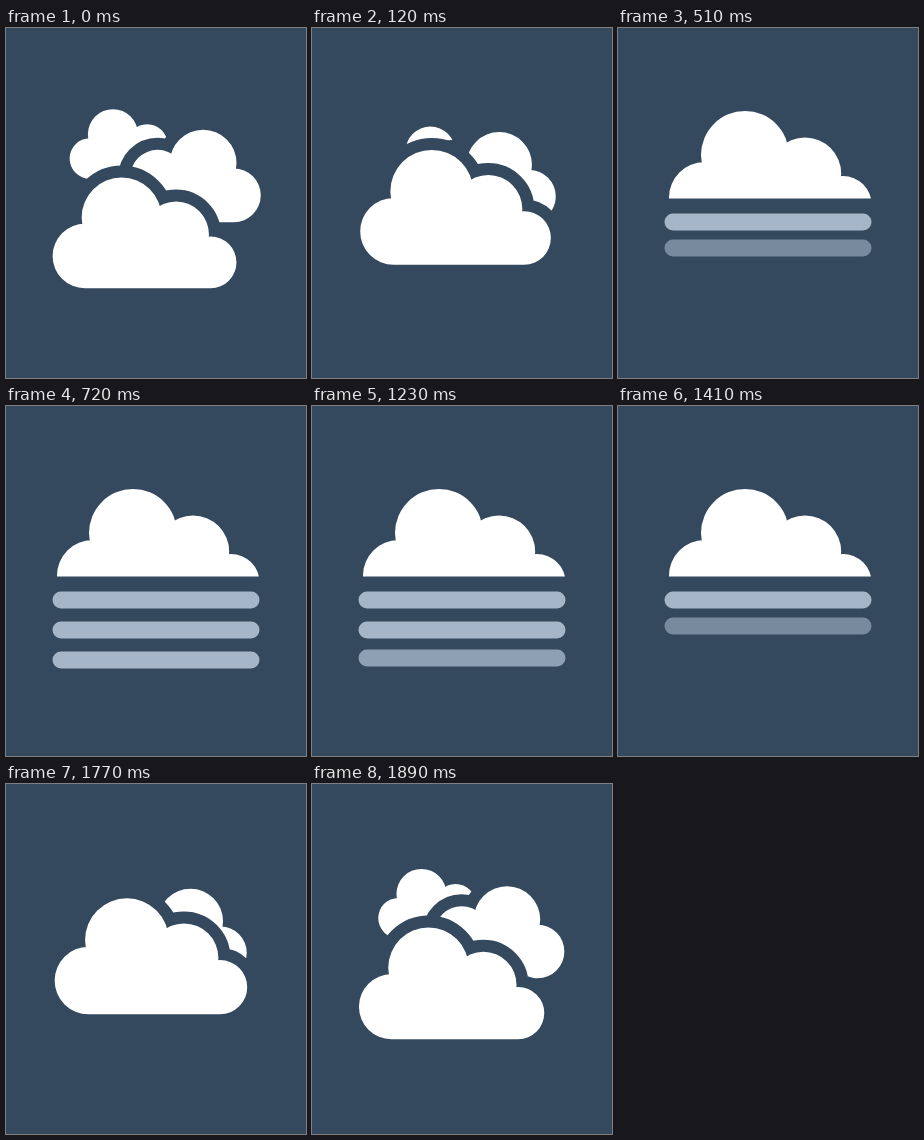
Recreate the animation shown at these times as an HTML page with a canvas. Size 300 by 350 pixels, loop 1920 ms.

```html
<!DOCTYPE html>
<html lang="en">
<head>
<meta charset="utf-8">
<title>Clouds to fog</title>
<style>
  html, body { margin: 0; width: 100%; height: 100%; overflow: hidden; background: #34495e; }
  canvas { display: block; }
</style>
</head>
<body>
<canvas id="stage" width="300" height="350"></canvas>
<script>
const ctx = document.getElementById('stage').getContext('2d');
const SKY = '#34495e', WHITE = '#fff', MIST = '#a5b6c9';
const LOOP = 1920, MORPH = 720, STEP = 30, GAP = 12, CUT = 170.5;

// Cloud outline, origin at the middle of its base
const cloud = new Path2D();
for (const [x, y, r] of [[-65.5, -35.5, 35.5], [-25, -78, 44], [35, -59.3, 36.2], [73, -28.5, 28.5]]) {
  cloud.moveTo(x + r, y);
  cloud.arc(x, y, r, 0, Math.PI * 2);
}
cloud.moveTo(-65.5, 0);
for (const [x, y] of [[-65.5, -35.5], [-25, -78], [35, -59.3], [73, -28.5], [73, 0]]) cloud.lineTo(x, y);
cloud.closePath();

const ramp = (t, a, b) => Math.min(1, Math.max(0, (t - a) / (b - a)));
const mix = (a, b, p) => a + (b - a) * p;

function drawCloud(x, y, scale, flip, alpha = 1) {
  ctx.save();
  ctx.translate(x, y);
  ctx.scale(flip * scale, scale);
  ctx.lineWidth = 2 * GAP / scale;
  ctx.lineJoin = 'round';
  ctx.strokeStyle = ctx.fillStyle = SKY;
  ctx.stroke(cloud);
  if (alpha < 1) ctx.fill(cloud);
  ctx.globalAlpha = alpha;
  ctx.fillStyle = WHITE;
  ctx.filter = 'blur(0.5px)';
  ctx.fill(cloud);
  ctx.restore();
}

// Three clouds gather on one base point
function gather(t) {
  const p = Math.pow(ramp(t, 0, 300), 1.1);
  const move = (x, y, from, to, flip) =>
    drawCloud(mix(x, 152, p), mix(y, 196, p), mix(from, to, p), flip);
  move(121.2, 150.7, 0.57, 0.55, 1);
  move(178.2, 194.2, 0.758, 0.72, -1);
  move(138.3, 260.3, 0.908, 1, 1);
}

function band(top, bottom, draw) {
  ctx.save();
  ctx.beginPath();
  ctx.rect(0, top, 300, bottom - top);
  ctx.clip();
  draw();
  ctx.restore();
}

// The merged cloud sinks and loses everything below the cut
function sink(t) {
  const y = 196 + 9 * ramp(t, 300, 390);
  const fade = ramp(t, 295, 385);
  const part = alpha => () => drawCloud(152, y, 1, 1, alpha);
  band(0, CUT, part(1 - fade * (1 - fade)));
  if (fade < 1) band(CUT, 350, part(1 - fade));
}

function bar(y, p) {
  if (!p) return;
  ctx.globalAlpha = p;
  ctx.fillStyle = MIST;
  ctx.beginPath();
  ctx.roundRect(46.5, y - 10 * (1 - p), 207, 17, 8.5);
  ctx.fill();
  ctx.globalAlpha = 1;
}

function draw(t) {
  ctx.fillStyle = SKY;
  ctx.fillRect(0, 0, 300, 350);
  if (t < 300) gather(t);
  else sink(t);
  bar(185.5, ramp(t, 330, 420));
  bar(215.5, ramp(t, 420, 570));
  bar(245.5, ramp(t, 570, 720));
}

const start = performance.now();
function tick() {
  const t = Math.floor((performance.now() - start) % LOOP / STEP) * STEP;
  draw(Math.min(t, LOOP - t, MORPH));
  requestAnimationFrame(tick);
}
tick();
</script>
</body>
</html>
```
